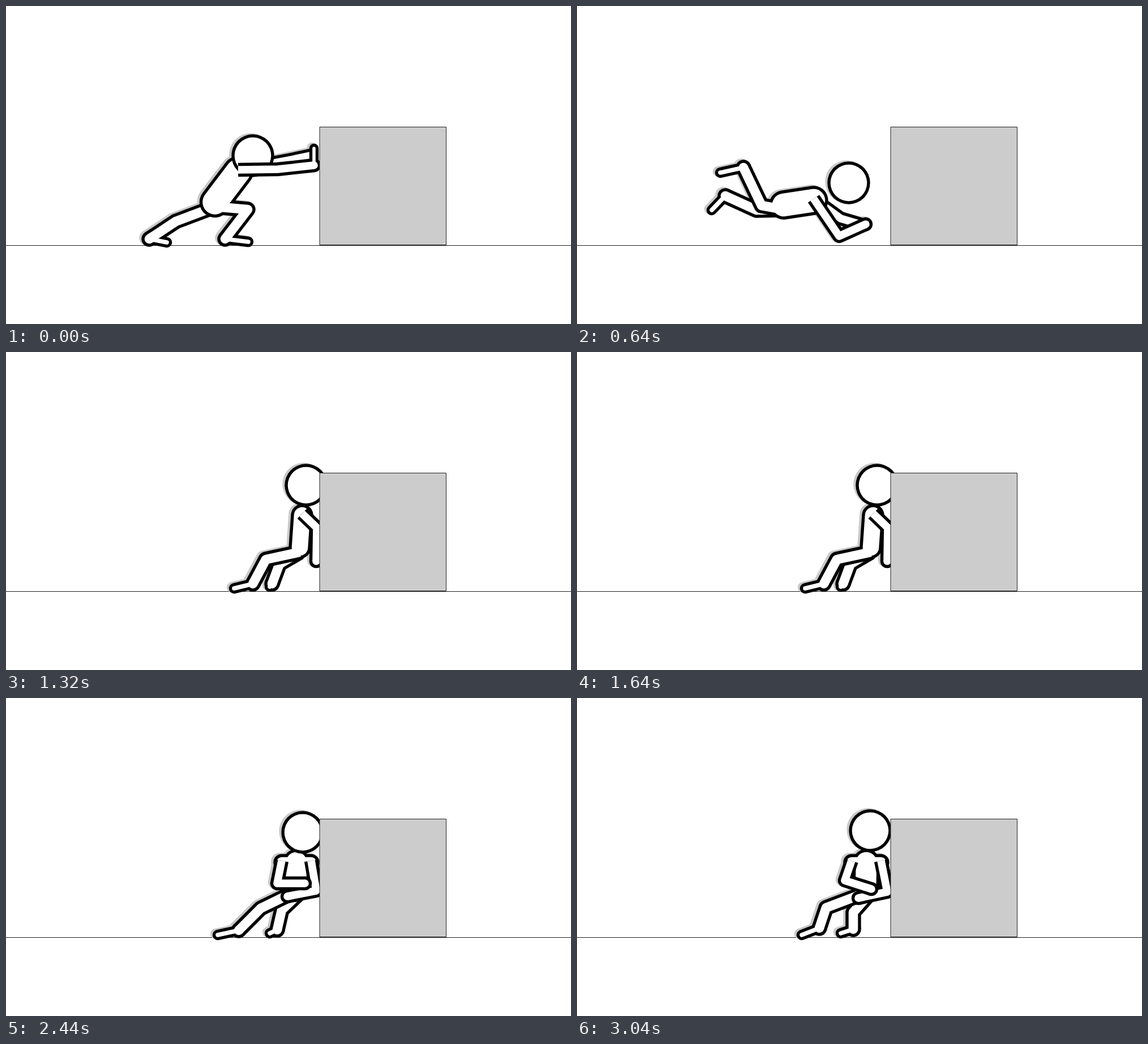
An HTML page for the animation above (3120 ms loop, 998x561 px).

```html
<!DOCTYPE html>
<html lang="en">
<head>
<meta charset="utf-8">
<title>Pushing the block</title>
<style>
  html, body { margin: 0; width: 100%; height: 100%; overflow: hidden; background: #fff; }
  svg { display: block; width: 100vw; height: 100vh; }
  #man path { fill: none; stroke-linejoin: round; }
</style>
</head>
<body>
<svg viewBox="0 0 998 561">
  <rect width="998" height="561" fill="#fff"/>
  <path d="M0 422.5H998" stroke="#222"/>
  <g id="man"></g>
  <path d="M554 213.5H777.5V421.5H554Z" fill="#ccc" stroke="#222"/>
</svg>
<script>
const LOOP = 3120, LINE = 5.4;
const WIDTH = { head: 70, arm: 19, palm: 11, leg: 22, foot: 13, shoulders: 24 };

// Joints of each pose. Arms: elbow, hand. Legs: knee, ankle, toe.
// build: torso width, half shoulder span, how far the palm is raised.
const push = {
  head: [436, 264], chest: [410, 292], hip: [369, 346], build: [49, 0, 30],
  armN: [480, 288, 544, 281], armF: [500, 272, 538, 264],
  legN: [427, 359, 387, 411, 428, 416], legF: [300, 380, 253, 411, 284, 417]
};
const slip = {
  head: [446, 265], chest: [414, 294], hip: [378, 336], build: [48, 0, 35],
  armN: [480, 289, 543, 286], armF: [480, 289, 538, 285],
  legN: [417, 367, 358, 390, 364, 413], legF: [318, 372, 272, 348, 246, 371]
};
const fall = {
  head: [480, 312], chest: [418, 343], hip: [365, 351], build: [46, 0, 0],
  armN: [463, 406, 510, 385], armF: [466, 375, 500, 385],
  legN: [326, 352, 294, 285, 253, 294], legF: [317, 360, 262, 335, 238, 360]
};
const slide = {
  ...fall, head: [468, 301], build: [46, 0, 15],
  armN: [490, 330, 543, 305], armF: [490, 328, 538, 304]
};
const prone = {
  head: [484, 386], chest: [425, 400], hip: [350, 404], build: [38, 0, 0],
  armN: [475, 414, 530, 412], armF: [470, 408, 520, 410],
  legN: [300, 408, 240, 400, 208, 414], legF: [300, 400, 230, 402, 202, 415]
};
const bounce = {
  ...prone,
  legN: [305, 395, 250, 355, 218, 362], legF: [290, 392, 210, 365, 182, 380]
};
const lean = {
  head: [530, 235], chest: [523, 288], hip: [519, 345], build: [34, 0, 0],
  armN: [549, 310, 548, 369], armF: [549, 310, 549, 365],
  legN: [459, 366, 436, 409, 403, 417], legF: [483, 374, 470, 409, 466, 414]
};
const hunch = {
  head: [475, 251], chest: [496, 297], hip: [494, 346], build: [44, 28, 0],
  armN: [462, 335, 515, 332], armF: [541, 327, 506, 351],
  legN: [440, 374, 433, 409, 404, 417], legF: [493, 380, 491, 409, 474, 415]
};
const shove = {
  head: [524, 237], chest: [513, 290], hip: [512, 336], build: [42, 26, 0],
  armN: [479, 327, 528, 327], armF: [548, 340, 497, 350],
  legN: [450, 371, 411, 410, 374, 418], legF: [487, 374, 479, 409, 466, 415]
};
const rest = {
  head: [518, 234], chest: [511, 290], hip: [510, 338], build: [42, 26, 0],
  armN: [473, 322, 520, 337], armF: [548, 342, 497, 353],
  legN: [440, 370, 428, 406, 397, 418], legF: [488, 378, 488, 408, 466, 415]
};
const sigh = { ...lean, head: [529, 239] };
const kick = { ...lean, legN: [445, 377, 385, 409, 346, 418] };
const settle = { ...shove, legN: rest.legN, legF: rest.legF };

const keys = [
  [0, push], [320, slip], [560, slide], [640, fall], [760, bounce],
  [880, prone], [1080, prone], [1320, lean], [1480, sigh], [1640, lean],
  [1800, kick], [2000, hunch], [2240, settle], [2440, shove],
  [2680, rest], [2880, shove], [3040, rest]
];

const range = (a, b, d) => Array.from({ length: (b - a) / d + 1 }, (_, i) => a + i * d);
const steps = [
  ...range(0, 720, 80), 760, 800, 880, ...range(1160, 1880, 80),
  ...range(2000, 2240, 80), 2360, 2440, ...range(2600, 2760, 80), 2880, 3040
];

function poseAt(t) {
  const next = keys.findIndex(k => k[0] > t);
  if (next < 0) return keys[keys.length - 1][1];
  const [t0, a] = keys[next - 1], [t1, b] = keys[next];
  const u = (t - t0) / (t1 - t0), pose = {};
  for (const name in a) pose[name] = a[name].map((v, i) => v + (b[name][i] - v) * u);
  return pose;
}

const pairs = list => range(0, list.length - 2, 2).map(i => [list[i], list[i + 1]]);
const tube = (width, pts, open) => ({ width, pts, open });

// Tubes grouped into parts, from back to front.
function partsOf(p) {
  const [girth, span, raise] = p.build;
  const shift = (pt, dx, dy = 0) => [pt[0] + dx, pt[1] + dy];
  const arm = (joints, dx, up) => {
    const [elbow, hand] = pairs(joints);
    return [
      tube(WIDTH.arm, [shift(p.chest, dx, -3), elbow, hand], true),
      tube(WIDTH.palm, [hand, shift(hand, 0, -up)])
    ];
  };
  const leg = (joints, dx) => {
    const [knee, ankle, toe] = pairs(joints);
    return [
      tube(WIDTH.leg, [shift(p.hip, dx, 8), knee, ankle], true),
      tube(WIDTH.foot, [ankle, toe])
    ];
  };
  const farArm = arm(p.armF, span, 0);
  const body = [
    tube(girth, [p.chest, p.hip]),
    tube(WIDTH.shoulders, [shift(p.chest, -span), shift(p.chest, span)]),
    ...leg(p.legN, -span / 4)
  ];
  const farLeg = leg(p.legF, span / 4);
  const head = [tube(WIDTH.head, [p.head, p.head])];
  const nearArm = arm(p.armN, -span, raise);
  const facing = span > 14;
  return facing
    ? [farLeg, body, farArm, head, nearArm]
    : [farArm, farLeg, body, head, nearArm];
}

function stroke({ width, pts, open }, color, grow) {
  const path = (list, cap) =>
    `<path d="M${list.join("L")}" stroke="${color}" stroke-width="${width + grow}" stroke-linecap="${cap}"/>`;
  const tip = pts[pts.length - 1];
  return path(pts, open ? "butt" : "round") + (open ? path([tip, tip], "round") : "");
}

const strokes = (tubes, color, grow) => tubes.map(t => stroke(t, color, grow)).join("");
const man = document.getElementById("man");

function draw(ms) {
  const now = ms % LOOP;
  const parts = partsOf(poseAt(steps.filter(s => s <= now).pop() || 0));
  const shade = strokes(parts.flat(), "#c9c9c9", LINE);
  const ink = parts.map(p => strokes(p, "#000", LINE) + strokes(p, "#fff", -LINE));
  man.innerHTML = `<g transform="translate(-4 -2)">${shade}</g>${ink.join("")}`;
}

const start = performance.now();
function tick() {
  draw(performance.now() - start);
  requestAnimationFrame(tick);
}
tick();
</script>
</body>
</html>
```
